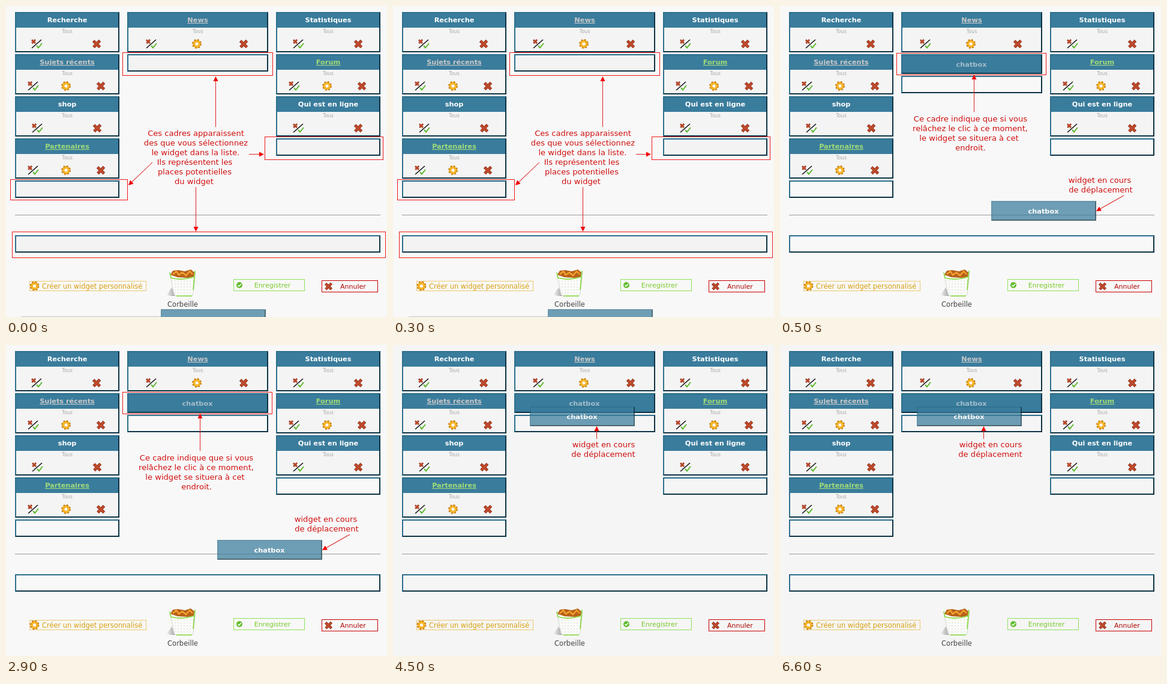
Recreate the animation shown at these times as an HTML page. Size 635 by 517 pixels, loop 8 s.

```html
<!DOCTYPE html>
<html lang="fr">
<head>
<meta charset="utf-8">
<title>Placement d'un widget</title>
<style>
  html, body { margin: 0; width: 100%; height: 100%; overflow: hidden; background: #f5f5f5; }
  svg { display: block; }
  text { font: 11px "DejaVu Sans", Verdana, sans-serif; text-anchor: middle; }
  .title { font-weight: bold; font-size: 11.3px; fill: #fff; }
  .small { font-size: 8px; fill: #a8a8a8; }
  .note { font-size: 13.1px; fill: #d01010; }
  .frame { fill: none; stroke: #f01818; }
  .left { text-anchor: start; }
</style>
</head>
<body>
<svg id="stage" width="635" height="517" viewBox="0 0 635 517">
  <defs>
    <g id="cross">
      <path d="M-5.5-5 5.5 5.5M5.5-5.5-5 5.5" stroke="#8c2c18" stroke-width="5"/>
      <path d="M-5-4.5 5 5M5-5-4.5 5" stroke="#bf4a2b" stroke-width="3.4"/>
    </g>
    <g id="gear" fill="none">
      <circle r="6.3" stroke="#c98209" stroke-width="3.4" stroke-dasharray="2.6 2.35"/>
      <circle r="4.5" stroke="#d58c0c" stroke-width="4"/>
      <circle r="4.3" stroke="#fcbb2a" stroke-width="2.6"/>
      <circle r="2.5" fill="#fff"/>
    </g>
    <g id="toggle" fill="none">
      <use href="#cross" transform="translate(-5 -4) scale(.55)"/>
      <path d="M-8 7 8-7" stroke="#111" stroke-width="1.6"/>
      <path d="M0 3 3 6.5 9-1" stroke="#58b82a" stroke-width="2"/>
    </g>
    <pattern id="dots" width="5" height="5" patternUnits="userSpaceOnUse">
      <circle cx="2" cy="2" r=".9" fill="#dcdedb"/>
    </pattern>
    <linearGradient id="shade" x1="0" x2="1">
      <stop stop-color="#888" stop-opacity=".1"/><stop offset="1" stop-color="#777" stop-opacity=".75"/>
    </linearGradient>
  </defs>
</svg>
<script>
const BLUE = '#3a7c9c', GREY_LINK = '#c9c9c9', GREEN_LINK = '#a0dc78';

const text = (x, y, content, cls, extra = '') =>
  `<text x="${x}" y="${y}" class="${cls}" ${extra}>${content}</text>`;
const rect = (x, y, w, h, fill) => `<rect x="${x}" y="${y}" width="${w}" height="${h}" fill="${fill}"/>`;
const outline = (x, y, w, h, color) =>
  `<rect x="${x + .5}" y="${y + .5}" width="${w - 1}" height="${h - 1}" fill="none" stroke="${color}"/>`;
const icon = (id, x, y, scale = 1) => `<use href="#${id}" transform="translate(${x} ${y}) scale(${scale})"/>`;

// Outset box with a light top left edge and a dark bottom right edge
const box = (x, y, w, h, fill) => rect(x, y, w, h, '#2d6f8c') +
  `<path d="M${x} ${y + h}h${w}v${-h}l-2 2v${h - 4}h${4 - w}z" fill="#0d3344"/>` +
  rect(x + 2, y + 2, w - 4, h - 4, fill);

function widget(x, y, w, title, icons, link) {
  const cx = x + w / 2;
  const style = link ? `style="fill:${link};text-decoration:underline"` : '';
  return box(x, y, w, 67, '#f4f4f4') + rect(x + 2, y + 2, w - 4, 24, BLUE) +
    text(cx, y + 17, title, 'title', style) + text(cx, y + 35, 'Tous', 'small') +
    icons.map((dx, i) => icon(icons.length < 3 && i ? 'cross' : ['toggle', 'gear', 'cross'][i], x + dx, y + 53)).join('');
}

const ghost = (x, y) => `<g opacity=".72">${box(x, y, 175, 33, BLUE)}${text(x + 87, y + 21, 'chatbox', 'title')}</g>`;

const note = (y, ...lines) =>
  lines.map(([content, x], i) => text(x, y + 16 * i, content, 'note')).join('');
const frame = (x, y, w, h) => `<rect x="${x + .5}" y="${y + .5}" width="${w}" height="${h}" class="frame"/>`;

function arrow(x1, y1, x2, y2) {
  const angle = Math.atan2(y2 - y1, x2 - x1) * 180 / Math.PI;
  const length = Math.hypot(x2 - x1, y2 - y1);
  return `<g transform="translate(${x2} ${y2}) rotate(${angle})" fill="#f00000">
    <path d="M${-length} 0H-6" stroke="#e02020"/><path d="M0 0-8-4V4z"/></g>`;
}

const bin = `
  <path d="M268 480 276 468 284 482H274z" fill="url(#shade)"/>
  <path d="M273 444 280 479Q281 482 285 482H308Q312 482 312 478L316 443z" fill="#fbfcfa" stroke="#d3d8d0"/>
  <path d="M276 453 281 479H311L314 453z" fill="url(#dots)"/>
  <path d="M274 447 278 440 287 439 298 441 308 438 314 443 313 450 303 452 286 451z" fill="#b8621a"/>
  <path d="M278 446 284 441 288 447 294 443 300 448 306 441 311 446" fill="none" stroke="#f2a12e" stroke-width="2.4"/>
  <path d="M273 443 275 452Q294 457 314 450L315 440M314 450 312 472M284 482H310" fill="none" stroke="#85d83c" stroke-width="1.6"/>`;

const plain = [36, 136], full = [30, 85, 143];
const common =
  widget(15, 10, 174, 'Recherche', plain) +
  widget(15, 80, 174, 'Sujets récents', full, GREY_LINK) +
  widget(15, 150, 174, 'shop', [37, 137]) +
  widget(15, 220, 174, 'Partenaires', full, GREEN_LINK) +
  widget(202, 10, 235, 'News', [40, 116, 194], GREY_LINK) +
  widget(450, 10, 174, 'Statistiques', [37, 137]) +
  widget(450, 80, 174, 'Forum', full, GREEN_LINK) +
  widget(450, 150, 174, 'Qui est en ligne', [37, 137]) +
  rect(15, 347, 609, 1, '#9c9c9c') +
  outline(39, 457, 195, 17, '#ecc873') + icon('gear', 47.5, 465.5) +
  text(60, 470, 'Créer un widget personnalisé', 'left', 'fill="#d9a010" style="font-size:11.4px"') +
  bin + text(294.5, 500, 'Corbeille', '', 'fill="#444" style="font-size:11.5px"') +
  outline(379, 454, 119, 20, '#8fe05c') +
  '<circle cx="389" cy="464" r="5" fill="#62bd2e"/><path d="M386.5 464l2 2 3.5-4" fill="none" stroke="#fff" stroke-width="1.5"/>' +
  text(444, 468, 'Enregistrer', '', 'fill="#78c828"') +
  outline(526, 456, 94, 20, '#c80000') + icon('cross', 537.5, 466, .9) +
  text(578.5, 470, 'Annuler', '', 'fill="#b00000"');

const slots = (middleY, fill) =>
  box(15, 290, 174, 29, fill) + box(450, 220, 174, 29, fill) +
  box(15, 381, 609, 29, fill) + box(202, middleY, 235, 29, fill);
const target = box(202, 80, 235, 33, BLUE) + text(319, 101, 'chatbox', 'title', 'style="fill:#a3bdca"');

const scenes = [
  { until: 500, background: '#f8f8f8', content:
    slots(80, '#f3f3f3') +
    frame(194, 77, 250, 38) + frame(431, 217, 197, 38) + frame(7, 288, 195, 34) + frame(10, 375, 622, 43) +
    arrow(349.5, 201, 349.5, 117) + arrow(405, 246.5, 430, 246.5) +
    arrow(244, 260, 204, 298) + arrow(316.5, 301, 316.5, 375) +
    note(216, ['Ces cadres apparaissent', 316.5], ['des que vous sélectionnez', 316.5],
      ['le widget dans la liste.', 316], ['Ils représentent les', 314.5],
      ['places potentielles', 314.5], ['du widget', 313.5]) +
    rect(26, 516, 232, 1, '#c0c0c0') + ghost(258, 504) },
  { until: 4500, background: '#f8f8f8', content:
    slots(116, '#f8f8f8') + target + frame(194, 78, 249, 36) +
    arrow(323.5, 176, 323.5, 114) +
    note(192, ['Ce cadre indique que si vous', 317.5], ['relâchez le clic à ce moment,', 317],
      ['le widget se situera à cet', 315], ['endroit.', 317.5]) +
    ghost(352, 324) + arrow(573, 315, 527, 341) +
    note(294, ['widget en cours', 533], ['de déplacement', 534.5]) },
  { until: 8000, background: '#f5f5f5', content:
    slots(116, '#f5f5f5') + target + ghost(228, 102) +
    arrow(339.5, 156, 339.5, 135) +
    note(170, ['widget en cours', 351], ['de déplacement', 350.5]) },
];

const stage = document.getElementById('stage');
stage.insertAdjacentHTML('beforeend', scenes.map(scene =>
  `<g class="scene" visibility="hidden">${rect(0, 0, 635, 517, scene.background)}${common}${scene.content}</g>`).join(''));
const layers = stage.querySelectorAll('.scene');
const start = performance.now();

function draw() {
  const time = (performance.now() - start) % 8000;
  const current = scenes.findIndex(scene => time < scene.until);
  layers.forEach((layer, i) => layer.setAttribute('visibility', i === current ? 'visible' : 'hidden'));
  requestAnimationFrame(draw);
}
draw();
</script>
</body>
</html>
```
